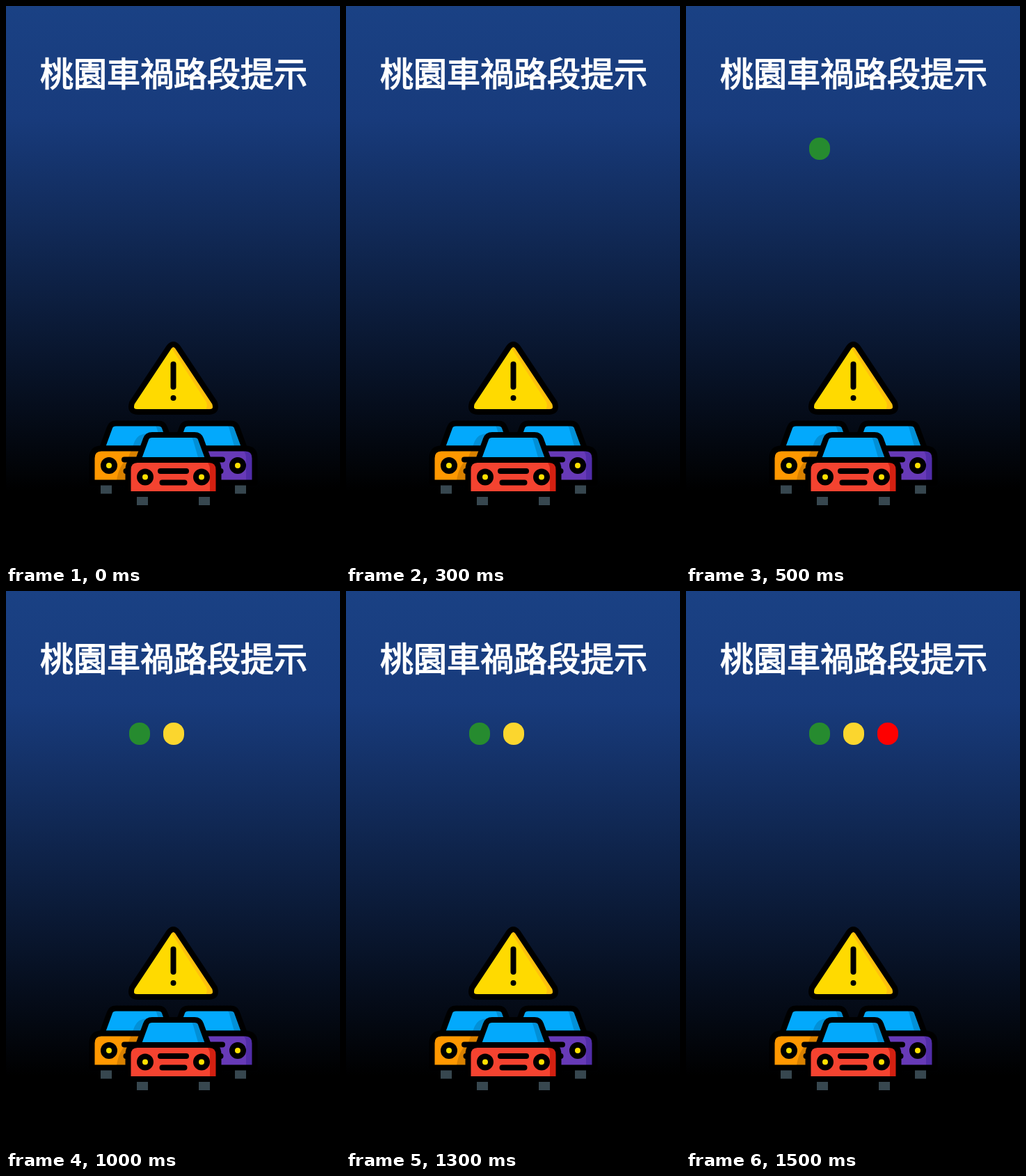
Write an HTML page that moves like this. It is 480 px wide and 800 px high and loops after 2 s.

```html
<!DOCTYPE html>
<html lang="zh-Hant">
<head>
<meta charset="utf-8">
<style>
  html, body { margin: 0; width: 100%; height: 100%; overflow: hidden; background: #000; }
  svg { display: block; width: 100%; height: 100%; }
  text { font: 48px "Noto Sans CJK TC", "Noto Sans CJK", sans-serif; fill: #fff; stroke: #fff; stroke-width: 1.500; }
  .line { stroke: #000; stroke-width: 8; stroke-linecap: round; stroke-linejoin: round; }
  .shade { fill: #000; fill-opacity: .15; }
  .red { color: #f44330; --dark: #d32011; }
  .orange { color: #ff9800; --dark: #f57c00; }
  .purple { color: #673ab7; --dark: #512da8; }
</style>
</head>
<body>
<svg viewBox="0 0 480 800">
  <defs>
    <linearGradient id="night" x2="0" y2="1">
      <stop offset="0" stop-color="#1a4184"/>
      <stop offset=".2" stop-color="#183b7c"/>
      <stop offset=".87" stop-color="#000"/>
    </linearGradient>
    <g id="car">
      <path id="roof" fill="#03a9fc" d="M190 652L201 622Q203 616 210 616H271Q278 616 280 622L291 652Z"/>
      <path class="shade" d="M264 616Q267 618 269 624L277 652H291L280 622Q278 616 271 616Z"/>
      <use href="#roof" class="line" fill-opacity="0"/>
      <path id="body" fill="currentColor" d="M175.500 701V666Q175.500 652 189 652H292Q305.500 652 305.500 666V701Z"/>
      <path style="fill: var(--dark)" d="M282 652Q293 654 293 666V701H305.500V666Q305.500 652 292 652Z"/>
      <use href="#body" class="line" fill-opacity="0"/>
      <g class="line" fill="#ffe100">
        <circle cx="200" cy="676.500" r="8"/>
        <circle cx="281" cy="676.500" r="8"/>
        <path d="M222 668H259M224.500 684.500H256.500"/>
      </g>
      <path fill="#37474f" d="M188 705h16v12h-16zM277 705h16v12h-16z"/>
    </g>
  </defs>

  <rect width="480" height="800" fill="url(#night)"/>
  <text x="241" y="115" text-anchor="middle">桃園車禍路段提示</text>

  <g id="lights">
    <rect x="177" y="189" width="30" height="32" rx="14.500" fill="#268b2f"/>
    <rect x="226" y="189" width="30" height="32" rx="14.500" fill="#fbd62e"/>
    <rect x="275" y="189" width="30" height="32" rx="14.500" fill="#fe0000"/>
  </g>

  <path id="sign" fill="#ffda00" d="M234.500 489.500Q240.500 482.500 246.500 489.500L300 570Q304 583 292 583H189Q177 583 181 570Z"/>
  <path fill="#ffc10d" d="M235 487L288 569Q291 577 284 583H292Q304 583 300 570L246.500 489.500Q241 483 235 487Z"/>
  <use href="#sign" class="line" fill-opacity="0"/>
  <path class="line" d="M240.500 514.500V547"/>
  <circle cx="240.500" cy="563" r="4"/>

  <use href="#car" class="orange" x="-52" y="-16.500"/>
  <path class="shade" d="M159 681Q162 660 175 650L185 625Q190 614 204 614V681Z"/>
  <use href="#car" class="purple" x="52" y="-16.500"/>
  <use href="#car" class="red"/>
</svg>
<script>
  const STEP = 500, LOOP = 2000;
  const lights = [...document.getElementById("lights").children];

  function draw() {
    const lit = Math.floor((performance.now() % LOOP) / STEP);
    lights.forEach((light, i) => light.style.visibility = i < lit ? "visible" : "hidden");
    requestAnimationFrame(draw);
  }
  draw();
</script>
</body>
</html>
```
